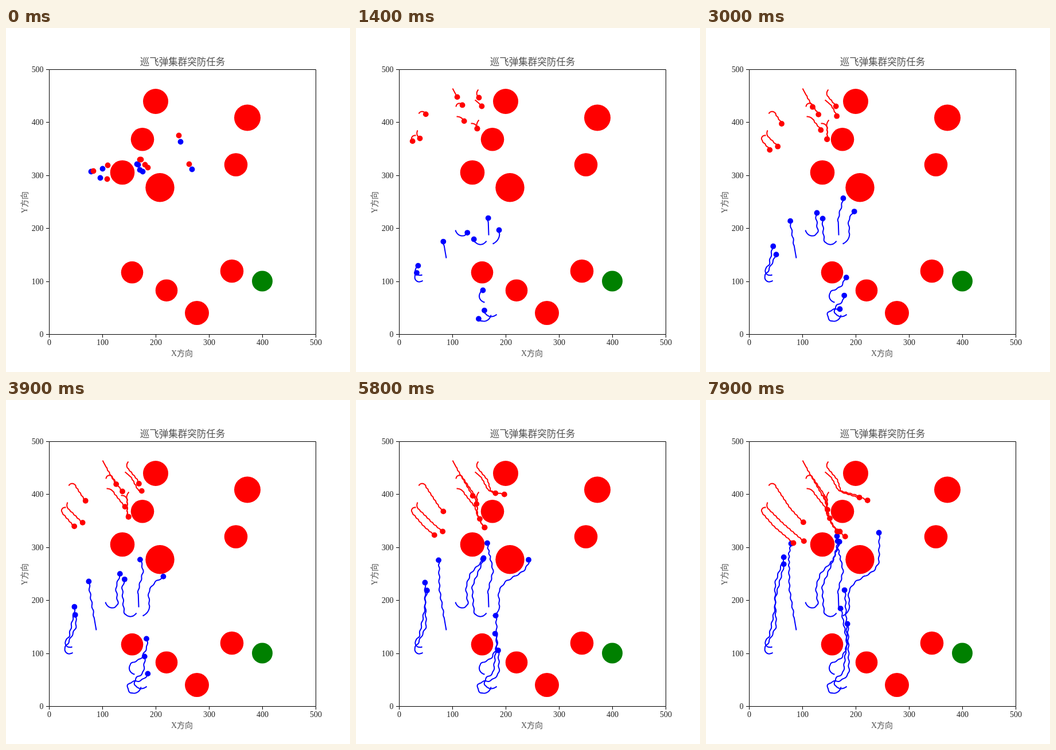
Write an HTML page with a canvas that moves like this. It is 600 px wide and 600 px high and loops after 8000 ms.

```html
<!DOCTYPE html>
<html lang="zh">
<head>
<meta charset="utf-8">
<style>
html, body { margin: 0; width: 100%; height: 100%; overflow: hidden; background: #fff; }
canvas, svg { position: absolute; left: 0; top: 0; width: 600px; height: 600px; }
text { font: 300 13.9px "Liberation Serif", "Noto Sans CJK SC Light", "Noto Sans CJK SC", "Noto Sans CJK", serif; fill: #222; text-anchor: middle; }
text.name { fill: #505050; }
text.title { font-size: 16.5px; }
text.y { text-anchor: end; }
</style>
</head>
<body>
<canvas id="stage" width="600" height="600"></canvas>
<svg id="labels" viewBox="0 0 600 600">
  <text class="name title" x="308" y="65">巡飞弹集群突防任务</text>
  <text class="name" x="307" y="572">X方向</text>
  <text class="name" transform="translate(36.5 304) rotate(-90)">Y方向</text>
</svg>
<script>
const STEP = 100, STEPS = 80;
const TURN_END = 14;              // opening turn lasts from step 1 to here
const DUEL_LENGTH = 42, DUEL_SPEED = 0.68;
const BLUE = { color: '#00f', turnLength: 29.3, weave: 0.9 };
const RED = { color: '#f00', turnLength: 16.3, weave: 0.5 };
const GREEN = '#008000';
const CW = 1, CCW = -1;
const ctx = document.getElementById('stage').getContext('2d');
const labels = document.getElementById('labels');
const units = [];

const dist = (a, b) => Math.hypot(b[0] - a[0], b[1] - a[1]);

// Circular arc of the given length between two points
function arc(a, b, length, side) {
  const chord = dist(a, b), dir = Math.atan2(b[1] - a[1], b[0] - a[0]);
  let lo = 0.001, hi = 3;
  for (let i = 0; i < 40; i++) {
    const mid = (lo + hi) / 2;
    if (Math.sin(mid) / mid > chord / length) lo = mid; else hi = mid;
  }
  return u => {
    const r = chord * Math.sin(lo * u) / Math.sin(lo);
    const angle = dir + side * lo * (u - 1);
    return [a[0] + r * Math.cos(angle), a[1] + r * Math.sin(angle)];
  };
}

// Point at distance d along straight legs
function along(points, d) {
  for (let i = 1; i < points.length; i++) {
    const a = points[i - 1], b = points[i], len = dist(a, b);
    if (d <= len) return [a[0] + (b[0] - a[0]) * d / len, a[1] + (b[1] - a[1]) * d / len];
    d -= len;
  }
  return points[points.length - 1];
}

// Averages neighbours so that the legs join in soft bends
function soften(path) {
  return path.map((_, i) => {
    const w = Math.min(2, i, path.length - 1 - i);
    const part = path.slice(i - w, i + w + 1);
    return [0, 1].map(k => part.reduce((sum, p) => sum + p[k], 0) / part.length);
  });
}

function sway(path, size) {
  return path.map(([x, y], i) => {
    const [px, py] = path[Math.max(i - 1, 0)];
    const len = Math.hypot(x - px, y - py);
    const w = i > 9 && len > 0.3 ? size * Math.sin(i * 0.95) / len : 0;
    return [x - (y - py) * w, y + (x - px) * w];
  });
}

// One opening turn, then legs at cruise speed; duellists slow down near the end
function launch(team, side, coords, arrive = STEPS - 1, slow = 0) {
  const points = [];
  for (let i = 0; i < coords.length; i += 2) points.push([coords[i], coords[i + 1]]);
  const turn = arc(points[0], points[1], team.turnLength, side);
  const legs = points.slice(1);
  const total = legs.reduce((sum, p, i) => i ? sum + dist(legs[i - 1], p) : 0, 0);
  const fast = total - slow;
  const speed = (fast + slow / DUEL_SPEED) / (arrive - TURN_END);
  const path = [];
  for (let n = 1; n < STEPS; n++) {
    const run = speed * (n - TURN_END);
    const d = run > fast ? fast + (run - fast) * DUEL_SPEED : run;
    path.push(n <= TURN_END ? turn((n - 1) / (TURN_END - 1)) : along(legs, slow ? d : run));
  }
  units.push({ color: team.color, path: sway(soften(path), team.weave) });
}

const duel = (side, coords, arrive) => launch(BLUE, side, coords, arrive, DUEL_LENGTH);

// Each route: start, end of the turn, then bends
launch(BLUE, CW, [115, 430, 109, 415, 120, 361, 120, 318, 136, 274]);
launch(BLUE, CW, [116, 440, 106, 427, 122, 395, 120, 347, 136, 286]);
duel(CW, [157, 401, 152, 372, 145, 330, 144, 268, 148, 250], 77);
duel(CCW, [173, 352, 195, 357, 191, 326, 199, 302, 222, 278, 230, 246], 78);
duel(CW, [227, 371, 205, 368, 202, 325, 218, 287, 233, 247], 79);
duel(CW, [231, 361, 230, 331, 239, 298, 230, 259, 228, 237], 66);
launch(BLUE, CCW, [238, 376, 249, 352, 248, 333, 259, 317, 292, 298, 301, 284, 302, 231]);
launch(BLUE, CW, [224, 478, 221, 457, 235, 451, 246, 430, 242, 331]);
launch(BLUE, CW, [245, 499, 223, 492, 225, 485, 239, 476, 245, 420, 235, 363]);
launch(BLUE, CW, [235, 500, 213, 507, 210, 499, 217, 491, 236, 489, 249, 477, 247, 390]);

launch(RED, CW, [168, 105, 176, 120, 207, 174, 211, 191]);
launch(RED, CW, [174, 137, 185, 134, 206, 165, 215, 206]);
launch(RED, CW, [175, 154, 188, 162, 207, 186, 211, 200, 228, 229]);
launch(RED, CCW, [213, 107, 214, 121, 229, 139, 235, 160, 267, 170]);
launch(RED, CW, [207, 125, 219, 136, 230, 157, 264, 166, 281, 175]);
launch(RED, CW, [200, 166, 211, 175, 211, 200, 221, 220, 233, 229], 68);
launch(RED, CCW, [214, 160, 211, 175, 211, 200, 221, 220, 242, 238]);
launch(RED, CW, [109, 149, 121, 150, 146, 188, 169, 213]);
launch(RED, CCW, [107, 178, 111, 192, 133, 214, 170, 246]);
launch(RED, CCW, [104, 187, 98, 197, 118, 220, 152, 249], 75);

// Resting places shown before the run begins
const blueRest = [[148, 250], [168, 245], [164, 261], [228, 237], [230, 238], [233, 247], [238, 250], [304, 198], [324, 246]];
const redRest = [[152, 249], [177, 239], [176, 263], [233, 229], [235, 229], [242, 238], [247, 243], [301, 187], [319, 237]];

const zones = [
  [261, 128, 22], [421, 156.5, 23], [238, 194.3, 20.3], [203, 252, 21.3], [268.5, 278.3, 25.2],
  [401, 238.5, 20.3], [220, 426.3, 19.3], [280, 457.7, 19.3], [394, 424, 20.3], [333, 497, 21]
];

function disc(x, y, r, color) {
  ctx.fillStyle = color;
  ctx.beginPath();
  ctx.arc(x, y, r, 0, Math.PI * 2);
  ctx.fill();
}

const dot = ([x, y], color) => disc(x + 0.5, y + 0.5, 4.9, color);

function line(points, color, width) {
  ctx.strokeStyle = color;
  ctx.lineWidth = width;
  ctx.beginPath();
  points.forEach(([x, y]) => ctx.lineTo(x, y));
  ctx.stroke();
}

function addLabel(text, x, y, cls) {
  const el = document.createElementNS('http://www.w3.org/2000/svg', 'text');
  el.setAttribute('x', x);
  el.setAttribute('y', y);
  if (cls) el.setAttribute('class', cls);
  el.textContent = text;
  labels.append(el);
}

const tickX = i => 75.5 + 93 * i;
const tickY = i => Math.round(534 - 92.4 * i) + 0.5;

for (let i = 0; i <= 5; i++) {
  addLabel(i * 100, tickX(i), 553);
  addLabel(i * 100, 65.5, tickY(i) + 4.5, 'y');
}

function drawAxes() {
  ctx.strokeStyle = '#000';
  ctx.lineWidth = 1;
  ctx.strokeRect(75.5, 72.5, 465, 462);
  for (let i = 0; i <= 5; i++) {
    line([[tickX(i), 535], [tickX(i), 540]], '#000', 1);
    line([[70, tickY(i)], [75, tickY(i)]], '#000', 1);
  }
}

function draw(n) {
  ctx.fillStyle = '#fff';
  ctx.fillRect(0, 0, 600, 600);
  zones.forEach(([x, y, r]) => disc(x, y, r, RED.color));
  disc(447, 441.5, 18, GREEN);
  if (n === 0) {
    blueRest.forEach(p => dot(p, BLUE.color));
    redRest.forEach(p => dot(p, RED.color));
  } else {
    for (const { color, path } of units) {
      const trail = path.slice(0, n);
      line(trail.map(([x, y]) => [x + 0.5, y + 0.5]), color, 2);
      dot(trail[n - 1], color);
    }
  }
  drawAxes();
}

ctx.lineJoin = 'round';
const start = performance.now();
function tick() {
  const t = Math.max(0, performance.now() - start);
  draw(Math.floor(t / STEP) % STEPS);
  requestAnimationFrame(tick);
}
tick();
</script>
</body>
</html>
```
